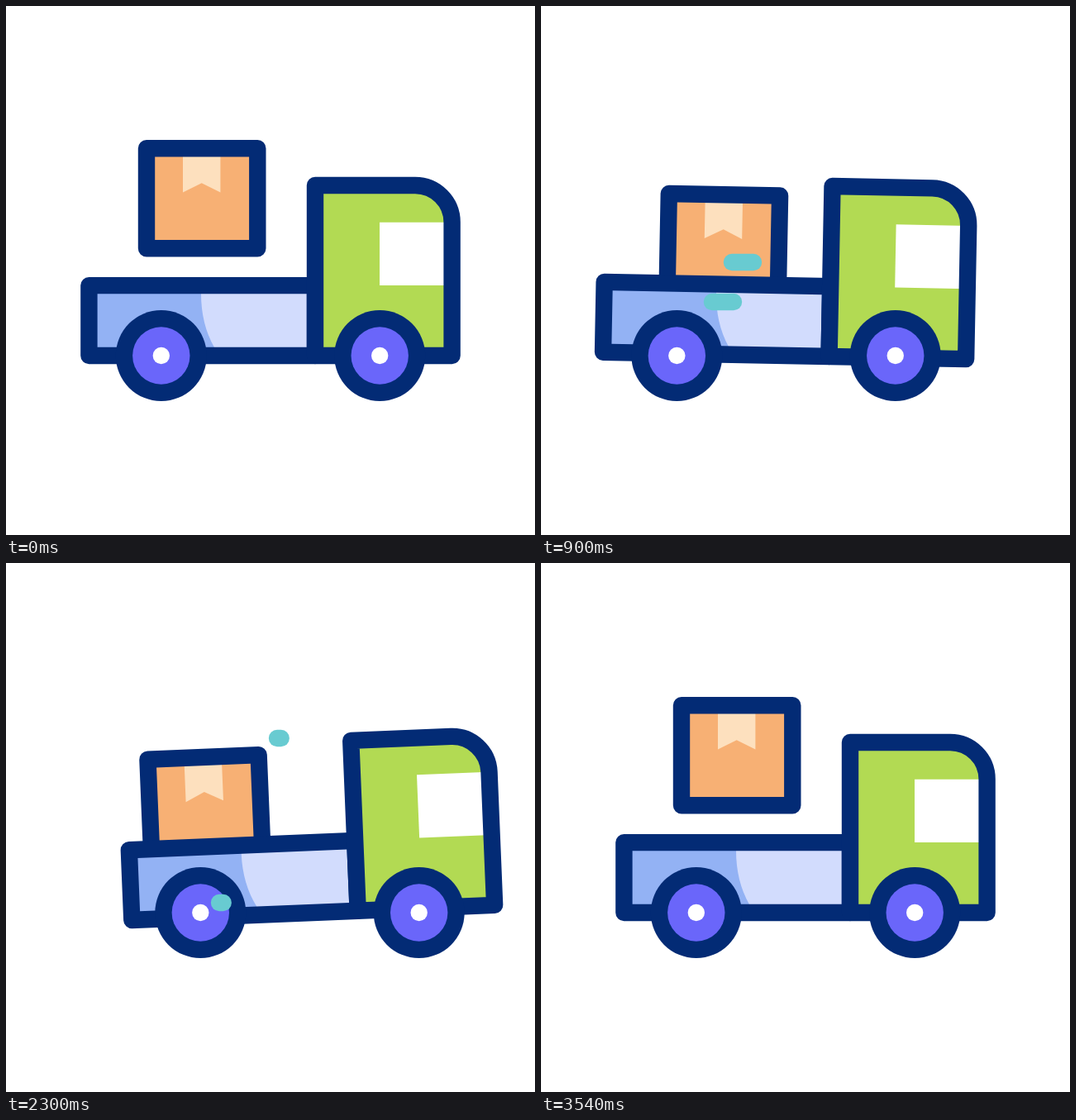
Recreate the animation shown at these times as an HTML page with a canvas. Size 640 px wide and 640 px high, loop 3.6 s.

```html
<!DOCTYPE html>
<html lang="en">
<head>
<meta charset="utf-8">
<title>Delivery truck</title>
<style>
html, body { margin: 0; width: 100%; height: 100%; overflow: hidden; background: #fff; }
canvas { display: block; width: 640px; height: 640px; }
</style>
</head>
<body>
<canvas id="stage" width="640" height="640"></canvas>
<script>
const ctx = document.getElementById('stage').getContext('2d');
const LOOP = 3600, LINE = 20.4;
const NAVY = '#032b75', TEAL = '#68cbd1';
const STREAK_TIME = 400, STREAK_LAG = 135;

// Smooth 0 to 1 between two times.
function ramp(t, from, to) {
  const p = Math.min(1, Math.max(0, (t - from) / (to - from)));
  return p * p * (3 - 2 * p);
}

// Wind up until `turn`, surge ahead, hold, rebound and settle at zero.
function swing(t, turn, windup, ahead, rebound) {
  return windup * ramp(t, 555, turn)
    + (ahead - windup) * ramp(t, turn, 1620)
    + (rebound - ahead) * ramp(t, 2178, 2785)
    - rebound * ramp(t, 2785, 3205);
}

function shape(path, fill) {
  ctx.fillStyle = fill;
  ctx.fill(new Path2D(path));
}

function outline(path) {
  ctx.strokeStyle = NAVY;
  ctx.lineWidth = LINE;
  ctx.lineJoin = 'round';
  ctx.stroke(new Path2D(path));
}

function disc(x, y, r, fill) {
  ctx.fillStyle = fill;
  ctx.beginPath();
  ctx.arc(x, y, r, 0, Math.PI * 2);
  ctx.fill();
}

function drawBox() {
  const frame = 'M170 172.2H304.3V293.2H170Z';
  shape(frame, '#f7b074');
  shape('M214 175H259.4V225.5L236.7 214.3L214 225.5Z', '#fde0be');
  outline(frame);
}

function drawBody() {
  const bed = 'M100.4 338.1H374V423H100.4Z';
  const cab = 'M374 217H495A44.6 44.6 0 0 1 539.6 261.6V423H374Z';
  shape(bed, '#d2dcfd');
  shape('M100.4 338H236V348Q236 385 252 413V423H100.4Z', '#93b2f4');
  outline(bed);
  shape(cab, '#b2da53');
  shape('M452 261.7H539V338H452Z', '#fff');
  outline(cab);
}

function drawWheel(x) {
  disc(x, 423, 55, NAVY);
  disc(x, 423, 34.7, '#6a66fa');
  disc(x, 423, 10.2, '#fff');
}

function drawTruck(t) {
  ctx.save();
  ctx.translate(swing(t, 990, -26.3, 56.3, -26.3), 0);

  ctx.save();
  ctx.translate(320, 320);
  ctx.rotate(swing(t, 920, 1.1, -3, 3) * Math.PI / 180);
  ctx.translate(-320, -320);

  ctx.save();
  const slide = swing(t, 860, 7, -51, 28.8);
  const drop = 57.5 * (ramp(t, 0, 540) - ramp(t, 3240, 3540));
  ctx.translate(slide, drop);
  drawBox();
  ctx.restore();

  drawBody();
  ctx.restore();

  drawWheel(187.8);
  drawWheel(452.2);
  ctx.restore();
}

// A streak shoots left from x; its tail follows the head after a lag.
function drawStreak(age, x, y, reach) {
  if (age <= 0 || age >= STREAK_TIME + STREAK_LAG) return;
  ctx.strokeStyle = TEAL;
  ctx.lineWidth = LINE;
  ctx.lineCap = 'round';
  ctx.beginPath();
  ctx.moveTo(x - reach * ramp(age, 0, STREAK_TIME), y);
  ctx.lineTo(x - reach * ramp(age - STREAK_LAG, 0, STREAK_TIME), y);
  ctx.stroke();
}

function drawPair(age, x, y, dx, dy, reach = 140) {
  drawStreak(age, x, y, reach);
  drawStreak(age, x + dx, y + dy, reach);
}

function draw(t) {
  ctx.fillStyle = '#fff';
  ctx.fillRect(0, 0, 640, 640);
  drawTruck(t);

  drawPair(t - 808, 257, 310, -24, 48, 190);
  drawPair(t - 908, 487, 374, 66, 45);
  drawPair(t - 1377, 468, 295, -47, 43);
  drawPair(t - 1810, 468, 212, -70, 199);
  drawPair(t - 2330, 468, 295, -47, 43);
}

const begin = performance.now();
function tick() {
  draw((performance.now() - begin) % LOOP);
  requestAnimationFrame(tick);
}
tick();
</script>
</body>
</html>
```
